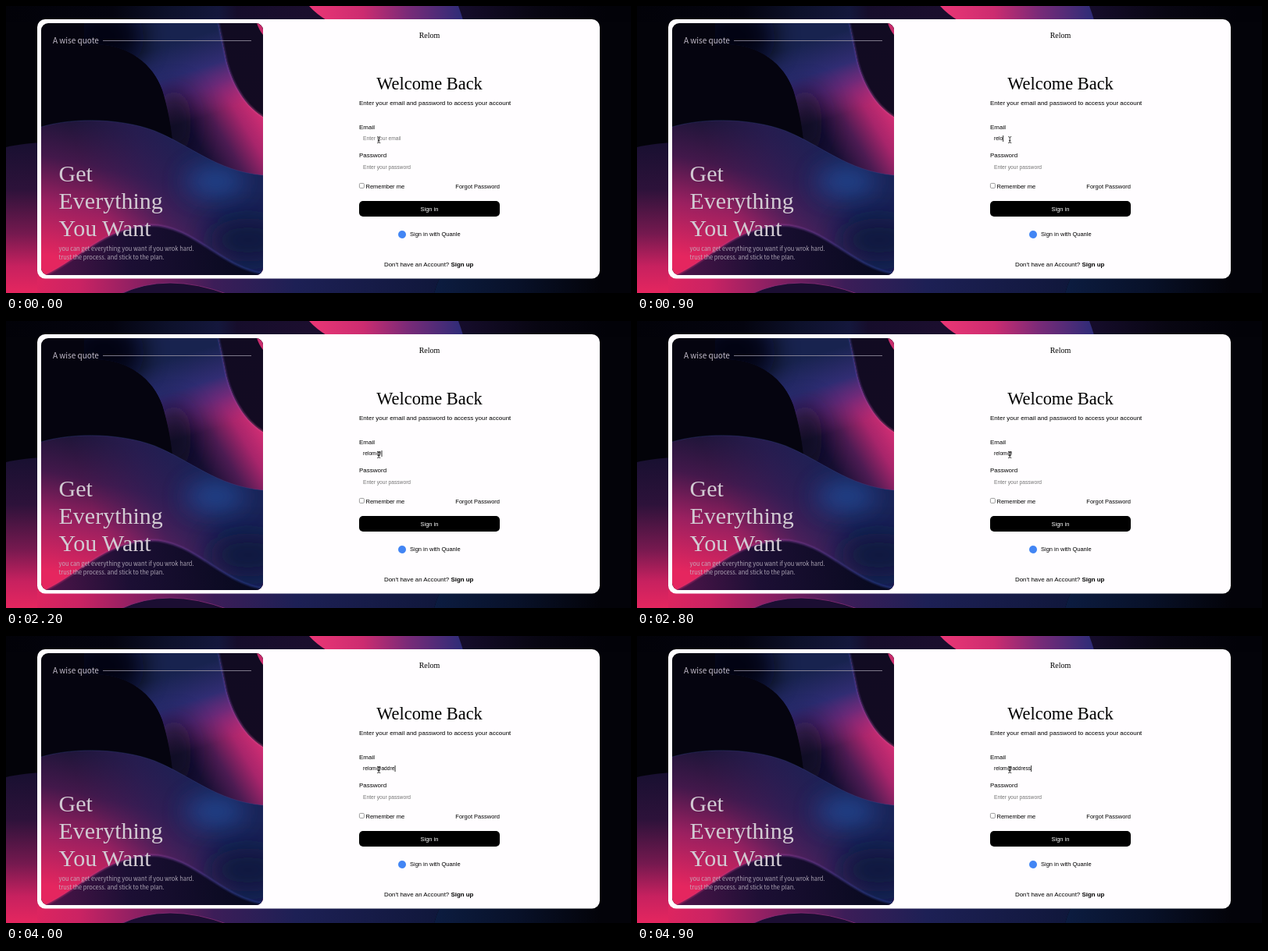
Write an HTML page that moves like this. It is 800 px wide and 368 px high and loops after 5000 ms.

```html
<!DOCTYPE html>
<html lang="en">
<head>
<meta charset="utf-8">
<title>Sign in</title>
<style>
html, body { margin: 0; width: 100%; height: 100%; overflow: hidden; background: #04030c; }
svg { display: block; width: 800px; height: 368px; }
text { font-family: "Liberation Sans", Arial, sans-serif; white-space: pre; }
.serif { font-family: "Liberation Serif", "Times New Roman", serif; }
.quote { font-family: "Noto Sans CJK JP", "Noto Sans CJK SC", "Noto Sans", sans-serif; fill: #c4bdca; }
.s8 { font-size: 8px; }
.s75 { font-size: 7.5px; }
.field { font-size: 6.67px; }
.hint { fill: #757575; }
</style>
</head>
<body>
<svg viewBox="0 0 800 368">
  <defs>
    <clipPath id="panel"><rect x="45" y="22" width="284" height="323" rx="9"/></clipPath>
    <path id="band" d="M100 50C150 44 188 72 200 108C209 138 212 158 216 200L329 230V142C302 126 285 90 280 60C277 45 274 32 272 22H100Z"/>
    <path id="swell" d="M45 155C90 142 150 145 190 160C235 178 270 212 329 217V345H45Z"/>
    <path id="hill" d="M50 345C95 324 125 284 185 281C240 281 275 335 329 343V345Z"/>
    <clipPath id="inBand"><use href="#band"/></clipPath>
    <clipPath id="inSwell"><use href="#swell"/></clipPath>
    <filter id="soft" x="-100%" y="-100%" width="300%" height="300%"><feGaussianBlur stdDeviation="16"/></filter>
    <filter id="glow" x="-20%" y="-20%" width="140%" height="140%"><feGaussianBlur stdDeviation="1"/></filter>
    <linearGradient id="top" gradientUnits="userSpaceOnUse" x1="0" x2="800" y1="0" y2="0">
      <stop offset="0" stop-color="#020208"/><stop offset=".17" stop-color="#04040f"/>
      <stop offset=".26" stop-color="#0d112b"/><stop offset=".34" stop-color="#14173c"/>
      <stop offset=".37" stop-color="#160d2b"/><stop offset=".48" stop-color="#1b0e2e"/>
      <stop offset=".73" stop-color="#150c2a"/><stop offset=".85" stop-color="#080612"/>
      <stop offset=".96" stop-color="#020208"/>
    </linearGradient>
    <linearGradient id="pink" gradientUnits="userSpaceOnUse" x1="390" x2="582" y1="0" y2="0">
      <stop offset="0" stop-color="#ea3675"/><stop offset=".35" stop-color="#cc2c70"/>
      <stop offset=".65" stop-color="#792a78"/><stop offset="1" stop-color="#302c78"/>
    </linearGradient>
    <linearGradient id="side" gradientUnits="userSpaceOnUse" x1="0" x2="0" y1="178" y2="368">
      <stop offset="0" stop-color="#191031"/><stop offset=".3" stop-color="#2d123a"/>
      <stop offset=".6" stop-color="#75194f"/><stop offset=".82" stop-color="#c7215f"/>
      <stop offset="1" stop-color="#e5265f"/>
    </linearGradient>
    <linearGradient id="foot" gradientUnits="userSpaceOnUse" x1="30" x2="555" y1="0" y2="0">
      <stop offset="0" stop-color="#e0255f"/><stop offset=".12" stop-color="#cb2363"/>
      <stop offset=".25" stop-color="#922063"/><stop offset=".45" stop-color="#3c1d58"/>
      <stop offset=".65" stop-color="#1d2055"/><stop offset="1" stop-color="#10173b"/>
    </linearGradient>
    <linearGradient id="end" gradientUnits="userSpaceOnUse" x1="550" x2="760" y1="0" y2="0">
      <stop offset="0" stop-color="#0c1c40"/><stop offset=".5" stop-color="#081129"/>
      <stop offset="1" stop-color="#030309"/>
    </linearGradient>
    <linearGradient id="ribbon" gradientUnits="userSpaceOnUse" x1="190" x2="325" y1="190" y2="110">
      <stop offset="0" stop-color="#0a0820"/><stop offset=".35" stop-color="#170f33"/>
      <stop offset=".55" stop-color="#4c1b52"/><stop offset=".75" stop-color="#a8256b"/>
      <stop offset="1" stop-color="#e63278"/>
    </linearGradient>
    <linearGradient id="sky" gradientUnits="userSpaceOnUse" x1="255" x2="285" y1="35" y2="132">
      <stop offset="0" stop-color="#18234f"/><stop offset=".4" stop-color="#2a2d73" stop-opacity=".95"/>
      <stop offset=".65" stop-color="#532b7e" stop-opacity=".7"/><stop offset="1" stop-color="#8a2a80" stop-opacity="0"/>
    </linearGradient>
    <linearGradient id="corner" gradientUnits="userSpaceOnUse" x1="285" x2="329" y1="22" y2="140">
      <stop offset="0" stop-color="#110b22"/><stop offset="1" stop-color="#130b22"/>
    </linearGradient>
    <linearGradient id="wave" gradientUnits="userSpaceOnUse" x1="100" x2="62" y1="148" y2="322">
      <stop offset="0" stop-color="#1c1538"/><stop offset=".3" stop-color="#43184b"/>
      <stop offset=".62" stop-color="#9a2060"/><stop offset="1" stop-color="#e5265f"/>
    </linearGradient>
    <linearGradient id="blue" gradientUnits="userSpaceOnUse" x1="120" x2="265" y1="265" y2="215">
      <stop offset="0" stop-color="#3a1f5c" stop-opacity="0"/><stop offset=".5" stop-color="#2b1f58" stop-opacity=".7"/>
      <stop offset="1" stop-color="#1a2357"/>
    </linearGradient>
    <linearGradient id="crest" gradientUnits="userSpaceOnUse" x1="60" x2="300" y1="335" y2="310">
      <stop offset="0" stop-color="#4a1448"/><stop offset=".4" stop-color="#1c0f34"/>
      <stop offset="1" stop-color="#090a20"/>
    </linearGradient>
    <linearGradient id="rim" gradientUnits="userSpaceOnUse" x1="55" x2="300" y1="0" y2="0">
      <stop offset="0" stop-color="#e0316e"/><stop offset=".5" stop-color="#96409a"/>
      <stop offset="1" stop-color="#3047a0"/>
    </linearGradient>
    <linearGradient id="edge" gradientUnits="userSpaceOnUse" x1="0" x2="0" y1="22" y2="142">
      <stop offset="0" stop-color="#3a4ba0"/><stop offset=".5" stop-color="#7a48b0"/>
      <stop offset="1" stop-color="#e0508f"/>
    </linearGradient>
  </defs>

  <!-- backdrop -->
  <rect width="800" height="368" fill="#030309"/>
  <rect width="800" height="20" fill="url(#top)"/>
  <path d="M388 0Q397 10 410 18H585Q582 8 579 0Z" fill="url(#pink)"/>
  <path d="M0 181Q20 176 60 174V368H0Z" fill="url(#side)"/>
  <path d="M40 345H557Q551 356 548 368H40Z" fill="url(#foot)"/>
  <path d="M145 370Q205 340 285 370Z" fill="#1b0e32" stroke="#8a2c78" stroke-width=".8"/>
  <path d="M548 368Q551 356 557 345H760V368Z" fill="url(#end)"/>

  <rect x="40" y="17" width="720" height="332.5" rx="10" fill="#fffdff"/>

  <!-- artwork panel -->
  <g clip-path="url(#panel)">
    <rect x="45" y="22" width="284" height="323" fill="#05040f"/>
    <rect x="265" y="22" width="64" height="130" fill="url(#corner)"/>
    <path d="M321 22Q324 31 329 37V22Z" fill="#c92c6c"/>
    <g clip-path="url(#inBand)">
      <use href="#band" fill="url(#ribbon)"/>
      <use href="#band" fill="url(#sky)"/>
      <ellipse cx="125" cy="40" rx="52" ry="45" fill="#05040f" opacity=".9" filter="url(#soft)"/>
      <ellipse cx="215" cy="150" rx="22" ry="45" fill="#0b0920" opacity=".7" filter="url(#soft)"/>
    </g>
    <path d="M272 22C274 32 277 45 280 60C285 90 302 126 329 142" fill="none" stroke="url(#edge)" stroke-width="1.6" opacity=".7" filter="url(#glow)"/>
    <g clip-path="url(#inSwell)">
      <use href="#swell" fill="url(#wave)"/>
      <use href="#swell" fill="url(#blue)"/>
      <ellipse cx="268" cy="225" rx="38" ry="17" fill="#2855a8" opacity=".75" filter="url(#soft)"/>
      <ellipse cx="310" cy="300" rx="50" ry="28" fill="#10133a" opacity=".85" filter="url(#soft)"/>
    </g>
    <path d="M45 155C90 142 150 145 190 160C235 178 270 212 329 217" fill="none" stroke="#3a4a98" opacity=".35"/>
    <use href="#hill" fill="url(#crest)"/>
    <path d="M50 345C95 324 125 284 185 281C240 281 275 335 329 343" fill="none" stroke="url(#rim)" stroke-width="1.8" opacity=".75" filter="url(#glow)"/>
  </g>

  <text class="quote" x="60" y="48.3" font-size="10" font-weight="500">A wise quote</text>
  <rect x="124" y="44" width="190" height="1" fill="#a29dab" opacity=".75"/>
  <g font-size="30" fill="#d2cbd3">
    <text class="serif" x="67.5" y="225">Get</text>
    <text class="serif" x="67.5" y="260">Everything</text>
    <text class="serif" x="67.5" y="295">You Want</text>
  </g>
  <g font-size="7.5" opacity=".85">
    <text class="quote" x="67.5" y="314.3">you can get everything you want if you wrok hard.</text>
    <text class="quote" x="67.5" y="325">trust the process. and stick to the plan.</text>
  </g>

  <!-- form -->
  <text class="serif" x="542" y="41" font-size="10" text-anchor="middle">Relom</text>
  <text class="serif" x="542" y="106.8" font-size="22.4" text-anchor="middle">Welcome Back</text>
  <text class="s8" x="452" y="126.6">Enter your email and password to access your account</text>
  <text class="s8" x="452" y="158">Email</text>
  <text class="field hint" id="hint" x="457" y="172">Enter your email</text>
  <text class="field" id="typed" x="457" y="172"></text>
  <rect id="caret" y="166" width=".8" height="8"/>
  <text class="s8" x="452" y="194.4">Password</text>
  <text class="field hint" x="457" y="208.6">Enter your password</text>
  <rect x="452.4" y="227.4" width="6" height="6" rx="1.2" fill="#fff" stroke="#767676" stroke-width=".7"/>
  <text class="s75" x="460.5" y="233.6">Remember me</text>
  <text class="s75" x="632" y="233.6" text-anchor="end">Forgot Password</text>
  <rect x="452" y="250" width="180" height="20" rx="5"/>
  <text class="s75" x="542" y="262.6" text-anchor="middle" fill="#fff">Sign in</text>
  <circle cx="507" cy="293" r="5" fill="#4285f4"/>
  <text class="s75" x="517" y="295.4">Sign in with Quanle</text>
  <text x="484" y="334.3" font-size="7.92">Don't have an Account? <tspan font-weight="700">Sign up</tspan></text>

  <!-- pointer -->
  <path d="M475.2 167.6Q477 167.6 477.2 168.6Q477.4 167.6 479.2 167.6M477.2 168.4V174.8M475.2 175.6Q477 175.6 477.2 174.6Q477.4 175.6 479.2 175.6M476 172.6H478.4" fill="none" stroke="#111" stroke-width=".8"/>
</svg>
<script>
const LOOP = 5000, BLINK = 500;
const word = "relom@address";
const keys = [300, 500, 700, 800, 1100, 2000, 3200, 3400, 3600, 3800, 3900, 4300, 4500];
const get = id => document.getElementById(id);
const hint = get("hint"), typed = get("typed"), caret = get("caret");
const show = (el, on) => el.setAttribute("visibility", on ? "visible" : "hidden");
let last = -1;

function draw(t) {
  const n = keys.filter(k => k <= t).length;
  if (n !== last) {
    typed.textContent = word.slice(0, n);
    caret.setAttribute("x", 457.2 + (n ? typed.getComputedTextLength() : 0));
    show(hint, n === 0);
    last = n;
  }
  const idle = n ? t - keys[n - 1] : BLINK;
  show(caret, Math.floor(idle / BLINK) % 2 === 0);
}

const start = performance.now();
function tick(now) {
  draw(Math.max(0, now - start) % LOOP);
  requestAnimationFrame(tick);
}
draw(0);
requestAnimationFrame(tick);
</script>
</body>
</html>
```
